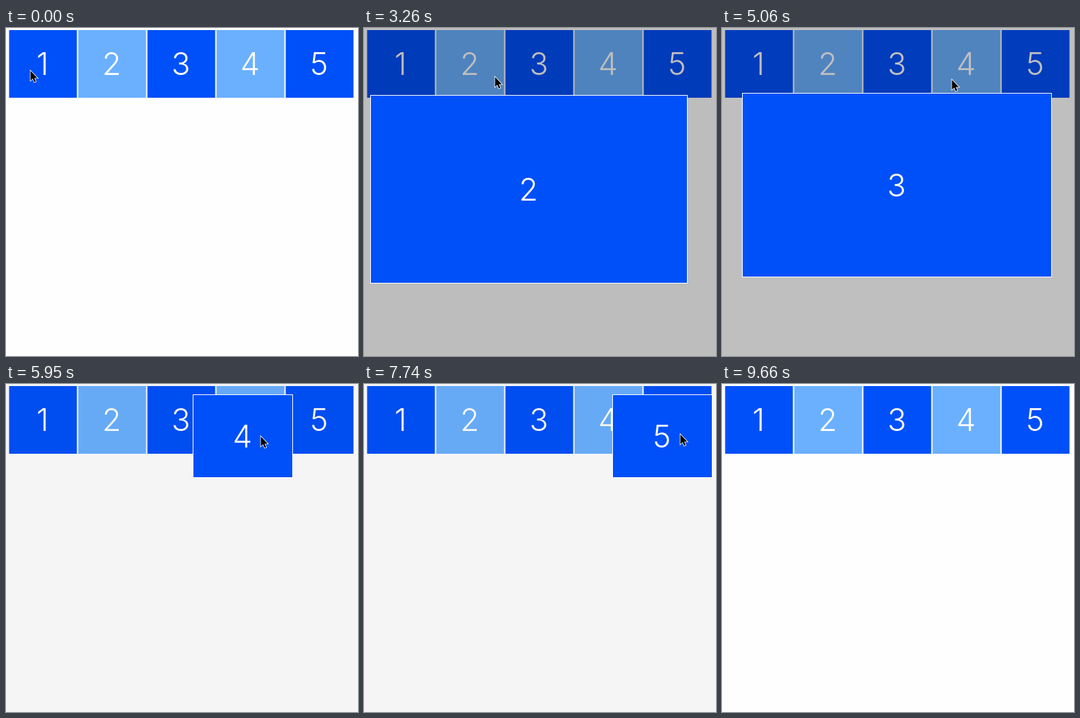
Animation of 509 by 475 pixels, one loop 9.96 s. Source, as an HTML page with a canvas:

```html
<!DOCTYPE html>
<html lang="en">
<head>
<meta charset="utf-8">
<title>Tiles opening into a dialog</title>
<style>
  html, body { margin: 0; width: 100%; height: 100%; overflow: hidden; background: #fefefe; }
  canvas { display: block; }
</style>
</head>
<body>
<canvas id="stage" width="509" height="475"></canvas>
<script>
const stage = document.getElementById('stage');
const ctx = stage.getContext('2d');
const LOOP = 9960, STEP = LOOP / 67, DURATION = 600;
const DARK = '#0050f9', LIGHT = '#6ab0ff', PAPER = '#fefefe';
const OPEN = { left: -7.5, top: 113.6, right: 514, bottom: 416 };

// Each tile is clicked at `from`; a click at `to` closes its dialog.
const visits = [
  { close: 1534, from: [35, 62], to: [138, 78] },
  { close: 3192, from: [165, 70], to: [189, 71] },
  { close: 4968, from: [262, 72], to: [332, 75] },
  { close: 6770, from: [368, 76], to: [386, 77] },
  { close: 8990, from: [457, 73], to: [445, 428] }
];
visits.forEach((visit, i) => visit.open = 529 + i * 12 * STEP);

const mix = (a, b, p) => a + (b - a) * p;
const clamp = v => Math.max(0, Math.min(1, v));
const smooth = p => p * p * (3 - 2 * p);

// cubic-bezier(.25, .1, .25, 1)
function ease(x) {
  if (x <= 0 || x >= 1) return clamp(x);
  let low = 0, high = 1, u;
  for (let i = 0; i < 24; i++) {
    u = (low + high) / 2;
    if (0.75 * u * (1 - u) + u ** 3 < x) low = u; else high = u;
  }
  return 0.3 * u * (1 - u) ** 2 + 3 * u * u * (1 - u) + u ** 3;
}

function tileBox(i) {
  const left = 4.5 + i * 100;
  return { left, top: 3, right: left + 98, bottom: 101 };
}

function fillBox(color, { left, top, right, bottom }, inset = 0) {
  ctx.fillStyle = color;
  ctx.fillRect(left + inset, top + inset, right - left - 2 * inset, bottom - top - 2 * inset);
}

function drawDigit(digit, { left, top, right, bottom }) {
  ctx.fillStyle = '#fff';
  ctx.fillText(digit, (left + right) / 2 - 0.7, (top + bottom) / 2 + 16);
}

function drawTile(i) {
  const box = tileBox(i);
  fillBox(i % 2 ? LIGHT : DARK, box);
  drawDigit(i + 1, box);
}

function drawDialog(i, p) {
  const box = tileBox(i);
  for (const side in box) box[side] = Math.round(mix(box[side], OPEN[side], p));
  ctx.fillStyle = `rgba(0,0,0,${0.305 * p})`;
  ctx.fillRect(0, 0, stage.width, stage.height);
  fillBox('#fff', box);
  fillBox(DARK, box, 1);
  drawDigit(i + 1, box);
}

function pointerAt(t) {
  const i = Math.max(0, visits.findLastIndex(visit => t >= visit.open));
  const { open, close, from, to } = visits[i];
  const next = visits[i + 1];
  const leaving = next && t > close + 100;
  const [a, b, begin] = leaving ? [to, next.from, close + 100] : [from, to, open + 100];
  const p = smooth(clamp((t - begin) / 500));
  return [mix(a[0], b[0], p), mix(a[1], b[1], p)];
}

function drawPointer(t) {
  if (t > visits.at(-1).close + DURATION) return;
  ctx.save();
  ctx.translate(...pointerAt(t));
  const arrow = new Path2D('M.5 0V14.2L3.8 11.2 6 16.4 8.2 15.5 6 10.4H10.4Z');
  ctx.lineWidth = 1.6;
  ctx.strokeStyle = '#fff';
  ctx.stroke(arrow);
  ctx.fillStyle = '#000';
  ctx.fill(arrow);
  ctx.restore();
}

function draw(t) {
  ctx.fillStyle = PAPER;
  ctx.fillRect(0, 0, stage.width, stage.height);
  ctx.font = '300 45px Inter, Roboto, sans-serif';
  ctx.textAlign = 'center';
  visits.forEach((_, i) => drawTile(i));
  visits.forEach(({ open, close }, i) => {
    const p = ease((t - open) / DURATION) - ease((t - close) / DURATION);
    if (p > 0) drawDialog(i, p);
  });
  drawPointer(t);
}

// The picture is held for one STEP at a time.
const start = performance.now();
function tick() {
  const t = (performance.now() - start) % LOOP;
  draw(Math.floor((t + 14) / STEP) * STEP);
  requestAnimationFrame(tick);
}
tick();
</script>
</body>
</html>
```
